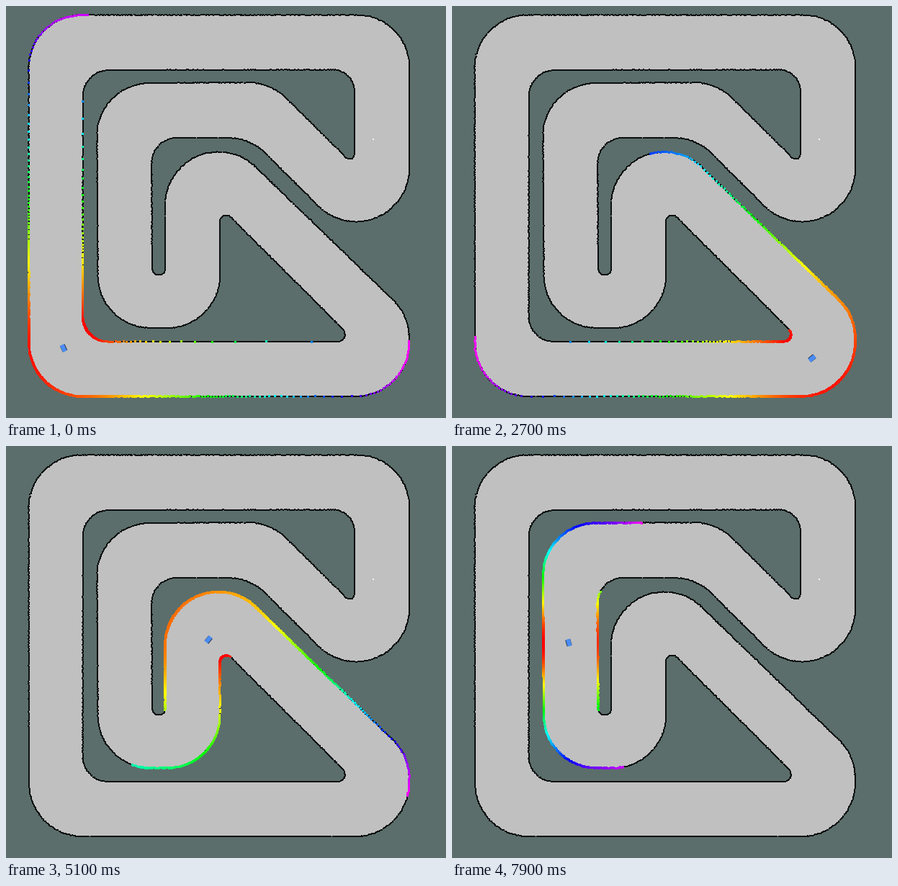
Recreate the animation shown at these times as an HTML page with a canvas. Size 611 by 572 pixels, loop 8 s.

```html
<!DOCTYPE html>
<html lang="en">
<head>
<meta charset="utf-8">
<title>Lidar lap</title>
<style>
  html, body { margin: 0; width: 100%; height: 100%; overflow: hidden; background: #5b6e6b; }
  canvas { display: block; }
</style>
</head>
<body>
<canvas id="stage" width="611" height="572"></canvas>
<script>
const W = 611, H = 572, LOOP = 8000, TICK = 100, RAYS = 1080;
const ctx = document.getElementById('stage').getContext('2d');

// Track walls as corners: x, y, rounding radius
const OUTER = [
  [31.5, 12.5, 73], [560, 12.5, 72], [560, 404, 74], [339, 183, 74], [202, 183, 35],
  [203, 373, 8], [221, 373, 8], [221, 102, 74], [560, 430, 74], [560, 542, 75], [32, 542, 74]
];
const INNER = [
  [107, 89, 36], [484, 88.5, 30], [484, 222, 7], [367, 106, 76], [126, 107.5, 73],
  [128, 447, 73], [297, 447, 73], [297, 278, 9], [485, 466, 10], [106.5, 466, 35]
];

// Key points of the drive: time, x, y
const ROUTE = [
  [0, 80, 475], [200, 91, 498], [1000, 218, 494], [2400, 456, 503], [2700, 500, 489],
  [3100, 512, 441], [4400, 353, 291], [5000, 289, 262], [5400, 264, 303],
  [5800, 265, 344], [6300, 231, 401], [6900, 162, 422], [7300, 153, 362],
  [7900, 162, 273], [8000, 157, 259]
];

function noise(n) {
  const s = Math.sin(n * 12.9898) * 43758.5453;
  return s - Math.floor(s) - 0.5;
}

// Closed path with every corner replaced by a tangent arc
function rounded(corners) {
  const n = corners.length;
  const parts = corners.map(([x, y, r], i) => {
    const [px, py] = corners[(i + n - 1) % n], [qx, qy] = corners[(i + 1) % n];
    const a = Math.atan2(py - y, px - x), b = Math.atan2(qy - y, qx - x);
    const turn = Math.sin(b - a), inside = Math.acos(Math.cos(b - a));
    const cut = r / Math.tan(inside / 2);
    const at = angle => `${x + cut * Math.cos(angle)} ${y + cut * Math.sin(angle)}`;
    return `${at(a)} A${r} ${r} 0 0 ${turn < 0 ? 1 : 0} ${at(b)}`;
  });
  return 'M' + parts.join(' L') + ' Z';
}

function sample(d, gap) {
  const path = document.createElementNS('http://www.w3.org/2000/svg', 'path');
  path.setAttribute('d', d);
  const len = path.getTotalLength(), n = Math.round(len / gap);
  return Array.from({ length: n }, (_, i) => path.getPointAtLength(i * len / n));
}

const outlines = [OUTER, INNER].map(rounded);
const walls = outlines.flatMap(d => sample(d, 4).map((p, i, pts) => {
  const q = pts[(i + 1) % pts.length];
  return { x: p.x, y: p.y, dx: q.x - p.x, dy: q.y - p.y };
}));

function rate(i, axis) {
  const a = ROUTE[i], b = ROUTE[i + 1];
  return (b[axis] - a[axis]) / (b[0] - a[0]);
}

// Speed at a key point: the shorter neighbouring stretch counts more
function speed(i, axis) {
  if (i === 0) return rate(0, axis);
  if (i === ROUTE.length - 1) return rate(i - 1, axis);
  const before = ROUTE[i][0] - ROUTE[i - 1][0], after = ROUTE[i + 1][0] - ROUTE[i][0];
  return (rate(i - 1, axis) * after + rate(i, axis) * before) / (before + after);
}

function along(t, axis) {
  let i = 0;
  while (i < ROUTE.length - 2 && t >= ROUTE[i + 1][0]) i++;
  const a = ROUTE[i], b = ROUTE[i + 1], d = b[0] - a[0], u = (t - a[0]) / d;
  const u2 = u * u, u3 = u2 * u;
  return (2 * u3 - 3 * u2 + 1) * a[axis] + (u3 - 2 * u2 + u) * d * speed(i, axis)
    + (3 * u2 - 2 * u3) * b[axis] + (u3 - u2) * d * speed(i + 1, axis);
}

function poseAt(t) {
  const x = along(t, 1), y = along(t, 2);
  return { x, y, heading: Math.atan2(along(t + 1, 2) - y, along(t + 1, 1) - x) };
}

function castRay(x, y, cx, cy) {
  let best = Infinity;
  for (const w of walls) {
    const det = cx * w.dy - cy * w.dx;
    if (!det) continue;
    const px = w.x - x, py = w.y - y;
    const u = (px * cy - py * cx) / det;
    if (u < 0 || u > 1) continue;
    const r = (px * w.dy - py * w.dx) / det;
    if (r > 0 && r < best) best = r;
  }
  return best;
}

// One lidar sweep, coloured from the nearest hit (red) to the farthest (magenta)
function scan(step) {
  const pose = poseAt(step * TICK), hits = [];
  let near = Infinity, far = 0;
  for (let i = 0; i < RAYS; i++) {
    const a = pose.heading + i * 2 * Math.PI / RAYS;
    const cx = Math.cos(a), cy = Math.sin(a), r = castRay(pose.x, pose.y, cx, cy);
    if (r === Infinity) continue;
    near = Math.min(near, r);
    far = Math.max(far, r);
    const shown = r + noise(i + step * RAYS);
    hits.push({ x: pose.x + cx * shown, y: pose.y + cy * shown, r });
  }
  for (const h of hits) h.hue = 300 * (h.r - near) / (far - near);
  return { pose, hits };
}

function dot(g, x, y, size) {
  g.fillRect(Math.round(x - size / 2), Math.round(y - size / 2), size, size);
}

function drawMap() {
  const map = document.createElement('canvas');
  map.width = W;
  map.height = H;
  const g = map.getContext('2d');
  g.fillStyle = '#5b6e6b';
  g.fillRect(0, 0, W, H);
  g.fillStyle = '#c0c0c0';
  g.fill(new Path2D(outlines.join(' ')), 'evenodd');
  // Walls are ragged cells of an occupancy grid
  g.fillStyle = '#0c0f0f';
  for (const d of outlines) {
    sample(d, 1.5).forEach((p, i) => dot(g, p.x + noise(i) * 0.8, p.y + noise(i + 0.5) * 0.8, 2));
  }
  g.fillStyle = '#f4f4f4';
  dot(g, 510, 185, 2);
  return map;
}
const map = drawMap();

function drawCar({ x, y, heading }) {
  ctx.save();
  ctx.translate(x, y);
  ctx.rotate(heading);
  ctx.fillStyle = '#26303c';
  ctx.fillRect(-4.5, -3.7, 9, 7.2);
  ctx.fillStyle = '#4a8cf5';
  ctx.fillRect(-5, -2.8, 9.8, 6);
  ctx.restore();
}

const scans = [];
let shownStep = -1;

function draw(step) {
  const { pose, hits } = scans[step] || (scans[step] = scan(step));
  ctx.drawImage(map, 0, 0);
  for (const h of hits) {
    ctx.fillStyle = `hsl(${h.hue.toFixed(1)} 100% 50%)`;
    dot(ctx, h.x, h.y, 3);
  }
  drawCar(pose);
}

const start = performance.now();
function frame() {
  const step = Math.floor((performance.now() - start) % LOOP / TICK);
  if (step !== shownStep) {
    draw(step);
    shownStep = step;
  }
  requestAnimationFrame(frame);
}
frame();
</script>
</body>
</html>
```
